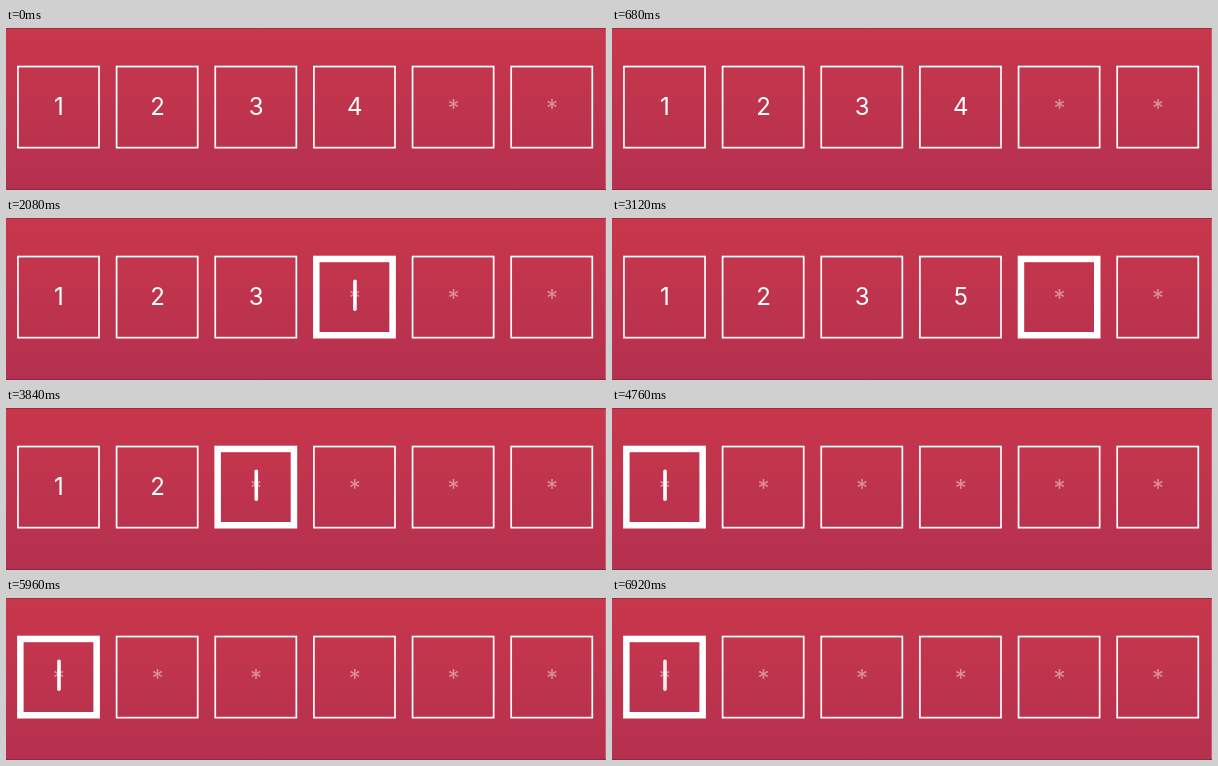
Write an HTML page that moves like this. It is 600 px wide and 162 px high and loops after 6.96 s.

```html
<!DOCTYPE html>
<html lang="en">
<head>
<meta charset="utf-8">
<title>Code entry</title>
<style>
  html, body { margin: 0; width: 100%; height: 100%; overflow: hidden; }
  svg { display: block; }
  rect.box { fill: none; stroke: #fff; }
  text { font: 24px Inter, Roboto, sans-serif; text-anchor: middle; fill: #fff; }
  text.empty { fill-opacity: .45; }
</style>
</head>
<body>
<svg id="stage" width="600" height="162" viewBox="0 0 600 162">
  <defs>
    <linearGradient id="bg" x2="0" y2="1">
      <stop stop-color="#c8374b"/>
      <stop offset="1" stop-color="#b5304f"/>
    </linearGradient>
  </defs>
  <rect width="600" height="162" fill="url(#bg)"/>
  <path d="M0 .5H600" stroke="#9c2e40"/>
  <path d="M0 161.5H600" stroke="#8a2a40"/>
  <path d="M599.5 1V161" stroke="#c75a6e"/>
</svg>
<script>
const LOOP = 6960, COUNT = 6, FIRST = 52.5, PITCH = 98.65;
const TOP = 37.7, SIZE = 82.8, THIN = 1.7, THICK = 6.5;

// [time, typed code, focused box, caret start]
const STATES = [
  [0, '1234', -1, 0],
  [920, '123', 3, 920],
  [2360, '1235', 4, 2360],
  [3360, '123', 3, 3360],
  [3840, '12', 2, 3840],
  [4320, '1', 1, 4320],
  [4760, '', 0, 4800]
];

const stage = document.getElementById('stage');

function add(name, attrs) {
  const el = document.createElementNS('http://www.w3.org/2000/svg', name);
  set(el, attrs);
  return stage.appendChild(el);
}

function set(el, attrs) {
  for (const key in attrs) el.setAttribute(key, attrs[key]);
}

const centre = i => FIRST + i * PITCH;

const boxes = Array.from({ length: COUNT }, (_, i) => ({
  frame: add('rect', { class: 'box' }),
  label: add('text', { x: centre(i) + .3 })
}));
const caret = add('rect', { y: 61.5, width: 3.6, height: 31.5, rx: 1.8, fill: '#fff' });

function smooth(from, to, x) {
  const p = Math.min(1, Math.max(0, (x - from) / (to - from)));
  return p * p * (3 - 2 * p);
}

// Fades out after 480 ms and back in before the next second.
function blink(age) {
  if (age < 480) return 1;
  const phase = (age - 480) % 1000;
  return 1 - smooth(0, 240, phase) + smooth(480, 680, phase);
}

function draw(t) {
  const [, code, focus, start] = STATES.findLast(s => s[0] <= t);
  boxes.forEach(({ frame, label }, i) => {
    const line = i === focus ? THICK : THIN;
    set(frame, {
      x: centre(i) - SIZE / 2 + line / 2, y: TOP + line / 2,
      width: SIZE - line, height: SIZE - line, 'stroke-width': line
    });
    const typed = i < code.length;
    label.textContent = typed ? code[i] : '*';
    set(label, { class: typed ? '' : 'empty', y: typed ? 87 : 89 });
  });
  set(caret, {
    x: centre(focus) - 1.3,
    opacity: focus < 0 ? 0 : blink(t - start)
  });
}

function tick() {
  draw(performance.now() % LOOP);
  requestAnimationFrame(tick);
}
tick();
</script>
</body>
</html>
```
